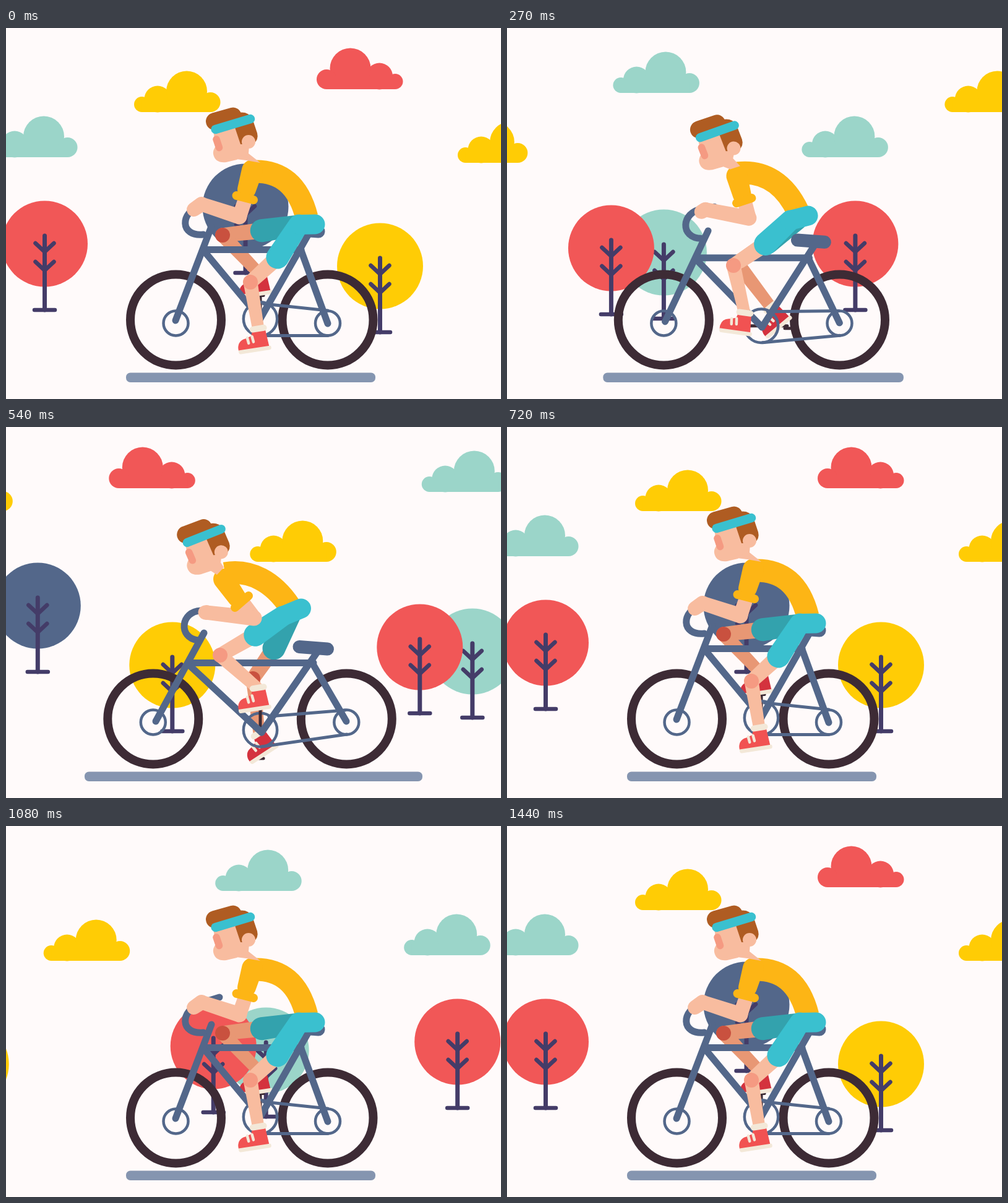
Write an HTML page with a canvas that moves like this. It is 800 by 600 pixels and loops after 1470 ms.

```html
<!DOCTYPE html>
<html lang="en">
<head>
<meta charset="utf-8">
<title>Cyclist</title>
<style>
  html, body { margin: 0; width: 800px; height: 600px; overflow: hidden; background: #fffafa; }
  canvas { display: block; }
</style>
</head>
<body>
<canvas id="stage" width="800" height="600"></canvas>
<script>
const ctx = document.getElementById('stage').getContext('2d');
const STEP = 30, LOOP = 1470, SCENE_STEPS = 24, CYCLE = 360;
const SPEED = 55.6, SPAN = 1336.5;

const C = {
  paper: '#fffafa', blue: '#53678a', ground: '#8595b0', tyre: '#3d2b35', trunk: '#443c68',
  yellow: '#ffcc05', red: '#f15757', mint: '#9bd5c9', shirt: '#fdb515', hair: '#af5c22',
  teal: '#3ac0cf', tealDark: '#33a2ad', skin: '#f8bc9f', skinDark: '#e89774',
  blush: '#f59a82', kneeDark: '#c9513f', shoe: '#f15252', shoeDark: '#d4323e', cream: '#f3e8d8'
};

const clouds = [
  [207, 136, C.yellow], [502, 99, C.red, true], [-24, 209, C.mint],
  [730, 218, C.yellow], [-329, 105, C.mint]
];
const trees = [
  [62.5, 349, C.red], [387, 289, C.blue], [604.5, 385, C.yellow],
  [-247, 363, C.mint], [-332, 356, C.red]
];

// Leg poses: time, sole x/y from the crank axle, foot tilt, knee x/y
const nearPose = [
  [0, -9, 50, -9, 395, 411], [30, 2, 52, -23, 395, 412.5], [90, 30, 16, -40, 380, 398],
  [150, 6, -22, -31, 354, 378], [180, -9, -34, -9, 346, 369], [270, -42, 10, 8, 366, 384]
];
const farPose = [
  [0, -7, -40, -9, 350, 335], [30, -10, -36, -6, 349, 340], [90, -42, 0, -10, 356, 366],
  [150, -5, 41, -40, 394, 401], [180, 6, 39, -33, 399, 407], [270, 28, 2, -40, 372, 380]
];

const mix = (a, b, t) => a + (b - a) * t;
const smooth = u => u * u * (3 - 2 * u);
const between = (a, b, t) => [mix(a[0], b[0], t), mix(a[1], b[1], t)];

// Smooth periodic curve through the poses
function samplePose(keys, time) {
  const n = keys.length;
  const key = i => {
    const turn = Math.floor(i / n), row = keys[i - turn * n];
    return [row[0] + turn * CYCLE, ...row.slice(1)];
  };
  let i = n - 1;
  while (keys[i][0] > time) i--;
  const [a, b, c, d] = [key(i - 1), key(i), key(i + 1), key(i + 2)];
  const h = c[0] - b[0], u = (time - b[0]) / h, s = smooth(u);
  return [1, 2, 3, 4, 5].map(j => {
    const m0 = (c[j] - a[j]) / (c[0] - a[0]), m1 = (d[j] - b[j]) / (d[0] - b[0]);
    return mix(b[j], c[j], s) + h * u * (1 - u) * (m0 * (1 - u) - m1 * u);
  });
}

function disc(color, [x, y], r) {
  ctx.fillStyle = color;
  ctx.beginPath();
  ctx.arc(x, y, r, 0, 7);
  ctx.fill();
}

function ring(color, w, [x, y], r) {
  ctx.strokeStyle = color;
  ctx.lineWidth = w;
  ctx.beginPath();
  ctx.arc(x, y, r, 0, 7);
  ctx.stroke();
}

function line(color, w, ...pts) {
  ctx.strokeStyle = color;
  ctx.lineWidth = w;
  ctx.beginPath();
  pts.forEach(p => ctx.lineTo(...p));
  ctx.stroke();
}

function poly(color, ...pts) {
  ctx.fillStyle = color;
  ctx.beginPath();
  pts.forEach(p => ctx.lineTo(...p));
  ctx.fill();
}

function shape(color, d) {
  ctx.fillStyle = color;
  ctx.fill(new Path2D(d));
}

// Tapered capsule
function limb(color, a, ra, b, rb) {
  const dir = Math.atan2(b[1] - a[1], b[0] - a[0]);
  const dist = Math.hypot(b[0] - a[0], b[1] - a[1]) || 1;
  const side = Math.acos(Math.max(-1, Math.min(1, (ra - rb) / dist)));
  ctx.fillStyle = color;
  ctx.beginPath();
  ctx.arc(...a, ra, dir + side, dir - side + 2 * Math.PI);
  ctx.arc(...b, rb, dir - side, dir + side);
  ctx.fill();
}

function drawCloud(left, bottom, color, flip) {
  ctx.save();
  ctx.translate(flip ? left + 139.5 : left, bottom);
  if (flip) ctx.scale(-1, 1);
  disc(color, [12.5, -12.5], 12.5);
  disc(color, [38, -21], 21.5);
  disc(color, [85, -33.5], 33);
  disc(color, [123.5, -16], 16);
  ctx.fillRect(12.5, -18, 111, 18);
  ctx.restore();
}

function drawTree(x, y, color) {
  disc(color, [x, y], 69.5);
  line(C.trunk, 7, [x, y - 13], [x, y + 107]);
  line(C.trunk, 6.5, [x - 16.5, y + 107], [x + 16.5, y + 107]);
  for (const dy of [0, 30])
    line(C.trunk, 6.5, [x - 15, y - 1 + dy], [x, y + 13 + dy], [x + 15, y - 1 + dy]);
}

function drawScenery(shift) {
  for (const offset of [shift, shift - SPAN]) {
    for (const [x, ...rest] of clouds) drawCloud(x + offset, ...rest);
    for (const [x, ...rest] of trees) drawTree(x + offset, ...rest);
  }
}

function drawShoe([x, y], tilt, color) {
  ctx.save();
  ctx.translate(x, y);
  ctx.rotate(tilt);
  shape(color, 'M-26,-2 L-26,-7 Q-24,-19 -12,-20 L-2,-23 L0,-29 L22,-29 L24,-2 Z');
  line(C.cream, 4.5, [-9, -21], [-8, -12]);
  line(C.cream, 4.5, [-1, -22], [0, -13]);
  line(C.cream, 10, [2, -33], [20, -33]);
  shape(C.cream, 'M-26,-3 L25,-3 Q27,-3 27,0 Q27,3.5 24,3.5 L-23,3.5 Q-27,3.5 -26,-3 Z');
  ctx.restore();
}

function drawLeg(pose, axle, hip, seatPoint, look) {
  const [fx, fy, deg, kx, ky] = pose;
  const foot = [axle[0] + fx, axle[1] + fy], knee = [kx, ky], tilt = deg * Math.PI / 180;
  const cos = Math.cos(tilt), sin = Math.sin(tilt);
  const ankle = [foot[0] + 11 * cos + 31 * sin, foot[1] + 11 * sin - 31 * cos];
  const hem = between(hip, knee, 0.57);
  const thigh = () => limb(look.skin, knee, 11.5, hem, 13);
  const shin = () => limb(look.skin, knee, 11.5, ankle, 9.5);
  thigh();
  shin();
  drawShoe(foot, tilt, look.shoe);
  disc(look.knee, knee, 12);
  limb(look.shorts, hem, 18.5, seatPoint, 16.5);
}

function drawHead(e) {
  ctx.save();
  ctx.translate(mix(366.5, 320, e), mix(155.5, 176, e));
  ctx.rotate(-0.085 * e);
  ctx.translate(-366.5, -155.5);
  shape(C.skin, 'M335,166 L372,155 L394,178 L390,200 L373,213 L356,217 Q338,219 335,204 Q334,198 339,191 Z');
  shape(C.hair, 'M369,158 L375,137 Q391,134 398,146 L406,170 Q409,181 399,188 L379,188 Z');
  limb(C.hair, [337, 151], 14, [367, 142], 13.5);
  disc(C.skin, [392, 184], 11);
  limb(C.blush, [340, 180], 5.8, [344.5, 193.5], 5.8);
  limb(C.teal, [338.5, 164], 7.2, [395, 147], 7.2);
  ctx.restore();
}

function drawFrame(step) {
  const time = step * STEP, phase = time % CYCLE;
  const e = smooth(phase < 195 ? phase / 195 : (CYCLE - phase) / 165) / 0.983;
  // Point moving from the crouched to the stretched pose
  const P = (x0, y0, x1, y1) => [mix(x0, x1, e), mix(y0, y1, e)];

  ctx.fillStyle = C.paper;
  ctx.fillRect(0, 0, 800, 600);
  ctx.lineCap = ctx.lineJoin = 'round';

  drawScenery(step * SPEED);

  const left = mix(194, 127, e), right = mix(597, 673, e);
  ctx.fillStyle = C.ground;
  ctx.beginPath();
  ctx.roundRect(left, 557.5, right - left, 15.5, 7);
  ctx.fill();

  const axle = P(411, 470.5, 411, 490);
  const frontX = mix(274.5, 237.8, e), rearX = mix(520, 550.3, e);
  const hip = P(497, 318, 478, 293);
  const angle = phase / CYCLE * 2 * Math.PI;
  const crankEnd = r => [axle[0] + r * Math.sin(angle), axle[1] + r * Math.cos(angle)];

  for (const x of [frontX, rearX]) ring(C.tyre, 14, [x, 472], 73.5);

  const farPedal = crankEnd(-42);
  line(C.tyre, 5, axle, farPedal);
  line(C.tyre, 5, [farPedal[0] - 4, farPedal[1] + 4], [farPedal[0] + 5, farPedal[1] + 4]);
  drawLeg(samplePose(farPose, phase), axle, hip, P(482, 318, 460, 304),
    { skin: C.skinDark, knee: C.kneeDark, shorts: C.tealDark, shoe: C.shoeDark });

  // Bike
  for (const x of [frontX, rearX]) ring(C.blue, 4.5, [x, 477.5], 20);
  ring(C.blue, 4.5, axle, 27.2);
  line(C.blue, 5, P(416, 446, 425, 468), P(520, 457, 548, 458));
  line(C.blue, 5, P(413, 497.5, 413, 517), P(520, 497.5, 551, 497));
  line(C.tyre, 5, axle, crankEnd(34));

  const crown = P(321, 358.5, 297, 381.5), cluster = P(477, 358.5, 497, 381.5);
  const bracket = P(411, 470, 413, 494);
  line(C.blue, 11, crown, cluster);
  line(C.blue, 11, P(322, 363, 297, 386), bracket);
  line(C.blue, 11, P(488, 335, 503, 364), bracket);
  line(C.blue, 11, P(477, 360, 494, 380), P(520, 478, 550, 476));
  line(C.blue, 11, P(332, 321, 320, 333), P(274, 473, 242, 476));
  limb(C.blue, P(463, 326, 474, 355.5), 10.5, P(505, 329, 519.5, 359), 10.5);

  ctx.strokeStyle = C.blue;
  ctx.lineWidth = 11;
  ctx.beginPath();
  ctx.moveTo(...P(345, 277, 328, 298));
  ctx.lineTo(...P(316, 286, 315, 297));
  ctx.bezierCurveTo(...P(280, 298, 282, 298), ...P(281, 338, 278, 341), ...P(319, 334, 310, 345));
  ctx.stroke();

  // Torso
  ctx.lineCap = 'butt';
  ctx.strokeStyle = C.shirt;
  ctx.lineWidth = 37;
  ctx.beginPath();
  ctx.moveTo(...P(398, 232, 354, 237));
  ctx.bezierCurveTo(...P(445, 230, 395, 230), ...P(473, 255, 432, 250), ...P(486, 306, 459, 291));
  ctx.stroke();
  ctx.lineCap = 'round';

  // Near leg and hips
  const waist = P(473, 318, 447, 306);
  drawLeg(samplePose(nearPose, phase), axle, hip, waist,
    { skin: C.skin, knee: C.blush, shorts: C.teal, shoe: C.shoe });
  limb(C.teal, waist, 16, P(499.5, 317.5, 477, 293.5), 16);

  // Arm
  const elbow = P(377, 305, 401, 309), wrist = P(316, 285, 324, 300);
  limb(C.skin, P(387, 276, 382, 283), 11.5, elbow, 12);
  limb(C.skin, elbow, 12.5, wrist, 11.5);
  limb(C.skin, wrist, 12, P(303.5, 293.5, 322, 300), 11.5);
  limb(C.shirt, P(398, 230, 352, 246), 17, P(389, 261, 373, 276), 15);
  limb(C.shirt, P(372.5, 271, 370, 292), 7, P(400, 278, 392, 273), 7);

  poly(C.skin, P(372, 212, 330, 232), P(393, 190, 351, 206), P(392, 203, 345, 216),
    P(411, 218, 352, 227), P(388, 214, 341, 239));
  drawHead(e);
}

function tick(now) {
  drawFrame(Math.floor((now % LOOP) / STEP) % SCENE_STEPS);
  requestAnimationFrame(tick);
}
drawFrame(0);
requestAnimationFrame(tick);
</script>
</body>
</html>
```
